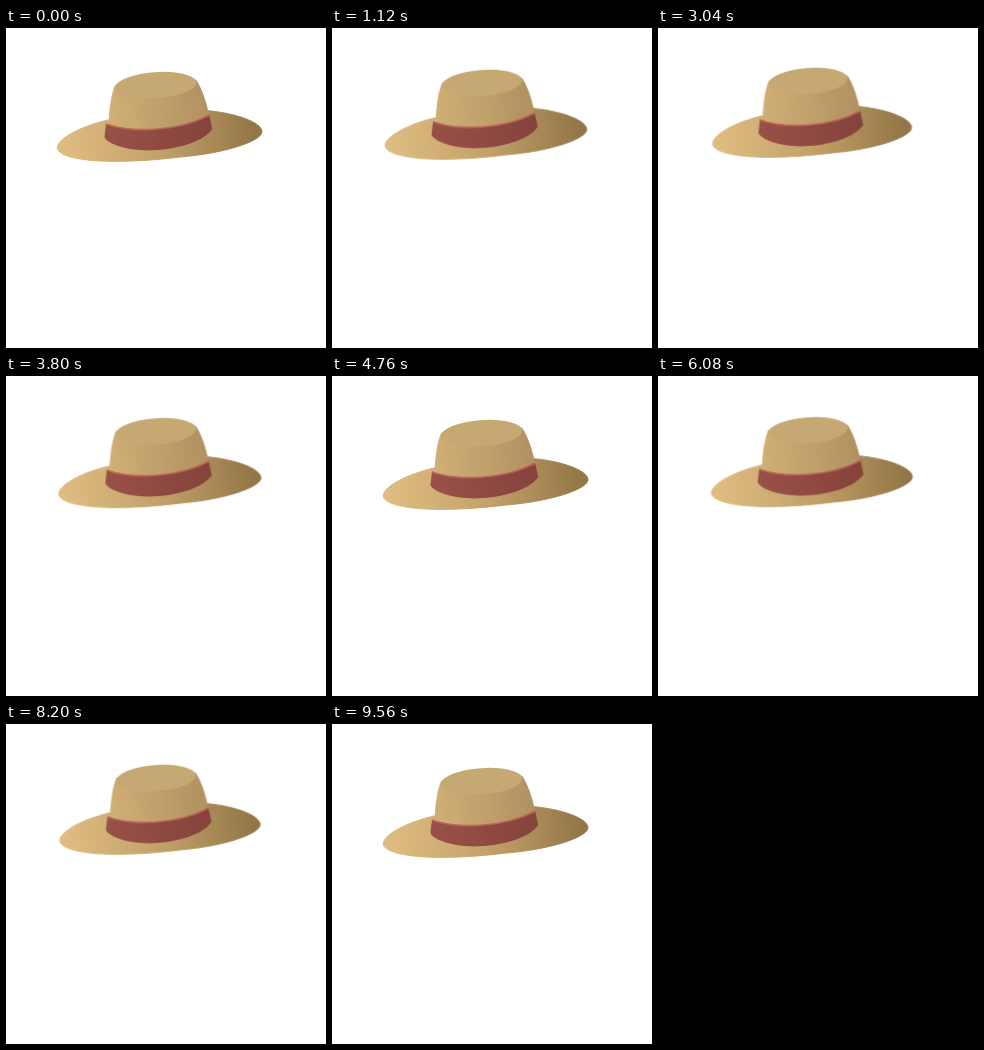
Recreate the animation shown at these times as an HTML page without scripts. Size 320 by 320 pixels, loop 9.6 s.

```html
<!DOCTYPE html>
<html lang="en">
<head>
<meta charset="utf-8">
<title>Floating straw hat</title>
<style>
  html, body { margin: 0; width: 100%; height: 100%; overflow: hidden; background: #fff; }
  svg { display: block; width: 100vw; height: 100vh; }
  .hat {
    transform-origin: 153.5px 90px;
    animation: float 2400ms cubic-bezier(.37, 0, .63, 1) infinite alternate;
  }
  .brim { fill: url(#brim); stroke: url(#brim); }
  .crown { fill: url(#crown); stroke: url(#crown); }
  @keyframes float {
    from { transform: none; }
    to { transform: translate(.5px, -5px) scaleX(.966); }
  }
</style>
</head>
<body>
<svg viewBox="0 0 320 320">
  <defs>
    <linearGradient id="brim" gradientUnits="userSpaceOnUse" x1="55" y1="120" x2="250" y2="100">
      <stop offset="0" stop-color="#dfbd82"/>
      <stop offset=".5" stop-color="#c3a26a"/>
      <stop offset="1" stop-color="#937647"/>
    </linearGradient>
    <linearGradient id="crown" gradientUnits="userSpaceOnUse" x1="104" y1="84" x2="202" y2="74">
      <stop offset="0" stop-color="#d0af76"/>
      <stop offset="1" stop-color="#b09160"/>
    </linearGradient>
    <linearGradient id="band" gradientUnits="userSpaceOnUse" x1="99" y1="108" x2="206" y2="98">
      <stop offset="0" stop-color="#985148"/>
      <stop offset="1" stop-color="#85433c"/>
    </linearGradient>
  </defs>
  <g class="hat">
    <path class="brim" d="M51.2 119.5C52 110 76 98 102 92L202 82.7C228 85 256 94 256 103.7
      C256 112 226 123 187 127.7C165 129.8 145 133.3 106 133.4C74 133 51.2 128 51.2 119.5Z"/>
    <path class="crown" d="M109.5 57C105 68 103.5 82 102.5 104Q155 112 203 90
      C201 77 196 61 189.8 52Z"/>
    <ellipse cx="149.7" cy="57.2" rx="40.7" ry="13.1" transform="rotate(-4 149.7 57.2)" fill="#c6a873"/>
    <path fill="url(#band)" d="M100 95.5C125 105 172 104 203 86.5L206.3 101
      C196 116 164 122.4 142 122.4C121 122.4 101 116 98.4 109Z"/>
    <path fill="none" stroke="#bd6558" stroke-width="1.6" d="M100.3 96.2C125 105 172 103.7 203 87.2"/>
  </g>
</svg>
</body>
</html>
```
